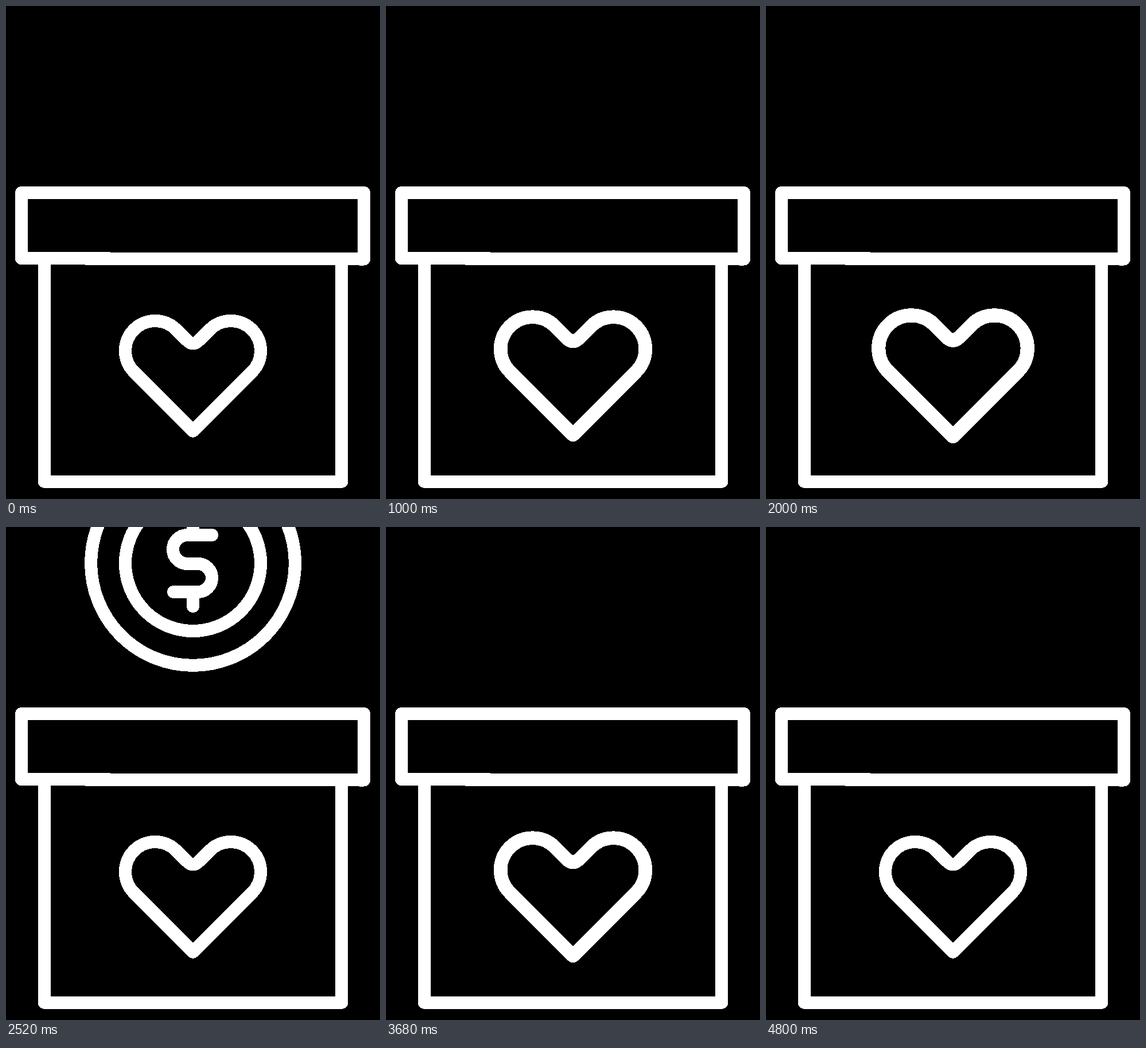
An HTML page for the animation above (4.88 s loop, 652 by 858 pixels).

```html
<!DOCTYPE html>
<html lang="en">
<head>
<meta charset="utf-8">
<title>Donation box</title>
<style>
  html, body { margin: 0; width: 100%; height: 100%; overflow: hidden; background: #000; }
  svg { display: block; }
</style>
</head>
<body>
<svg width="652" height="858" viewBox="0 0 652 858" fill="none" stroke="#fff" stroke-width="22.1"
     stroke-linecap="round" stroke-linejoin="round" shape-rendering="crispEdges">
  <clipPath id="slot"><path d="M0 0H652V325H0Z"/></clipPath>
  <g clip-path="url(#slot)">
    <g id="coin">
      <circle r="177.9"/>
      <circle r="118"/>
      <path d="M33 -49H-10A25 25 0 0 0 -10 1H8.5A24.5 24.5 0 0 1 8.5 50H-34M0 -74V-49M0 50V75"/>
    </g>
  </g>
  <path id="body" pathLength="1" d="M585.2 440V827.6H66.6V440"/>
  <path id="lid" pathLength="1" d="M27 325V439.23L624 440.48V325Z"/>
  <path id="heart" d="M0 95.6L-102.8 -7.2A52 52 0 0 1 -29.2 -80.8L-10 -61.6Q0 -51.6 10 -61.6L29.2 -80.8A52 52 0 0 1 102.8 -7.2Z"/>
</svg>
<script>
const LOOP = 4880, STEP = 40;
const [coin, body, lid, heart] = ['coin', 'body', 'lid', 'heart'].map(id => document.getElementById(id));

// Start times in ms; each cycle drops a coin, erases the box and draws it again.
const cycles = [
  { drop: 120, shrink: 840, erase: 990, eraseTime: 450, body: 1435, lid: 1499, grow: 1780, growTime: 420 },
  { drop: 2520, shrink: 3520, erase: 3690, eraseTime: 470, body: 4330, lid: 4390, grow: 4480, growTime: 320 }
];
const DRAW_TIME = 320;

const progress = (t, start, length) => Math.min(1, Math.max(0, (t - start) / length));
const smooth = x => x * x * (3 - 2 * x);
const quartInOut = x => x < .5 ? 8 * x ** 4 : 1 - 8 * (1 - x) ** 4;
const show = (el, on) => el.setAttribute('visibility', on ? 'inherit' : 'hidden');

function trim(path, from, to) {
  show(path, to > from);
  path.setAttribute('stroke-dasharray', `${to - from} 2`);
  path.setAttribute('stroke-dashoffset', -from);
}

function coinY(t) {
  if (t <= 520) return 207 - 144 * (1 - t / 520) ** 4;
  return 207 + 69 * ((t - 520) / 80) ** 1.12;
}

function heartScale(t, c) {
  if (t < c.grow) {
    const swell = 1 + .095 * smooth(progress(t, c.shrink, 240));
    return swell * (1 - smooth(progress(t, c.shrink + 240, 160)));
  }
  const half = c.growTime / 2;
  return 1.1 * smooth(progress(t, c.grow, half)) - .1 * smooth(progress(t, c.grow + half, half));
}

function render(t) {
  const c = cycles[t < 2400 ? 0 : 1];

  const fall = t - c.drop;
  show(coin, fall >= 0 && fall < 840);
  if (fall >= 0) coin.setAttribute('transform', `translate(326 ${coinY(fall)})`);

  const erased = quartInOut(progress(t, c.erase, c.eraseTime));
  for (const [path, start] of [[body, c.body], [lid, c.lid]]) {
    if (erased < 1) trim(path, erased, 1);
    else trim(path, 0, smooth(progress(t, start, DRAW_TIME)));
  }

  const scale = heartScale(t, c);
  show(heart, scale > 0);
  heart.setAttribute('transform', `translate(326 644) scale(${scale})`);
}

const origin = performance.now();
function tick() {
  const t = (performance.now() - origin) % LOOP;
  render(Math.floor(t / STEP) * STEP);
  requestAnimationFrame(tick);
}
tick();
</script>
</body>
</html>
```
